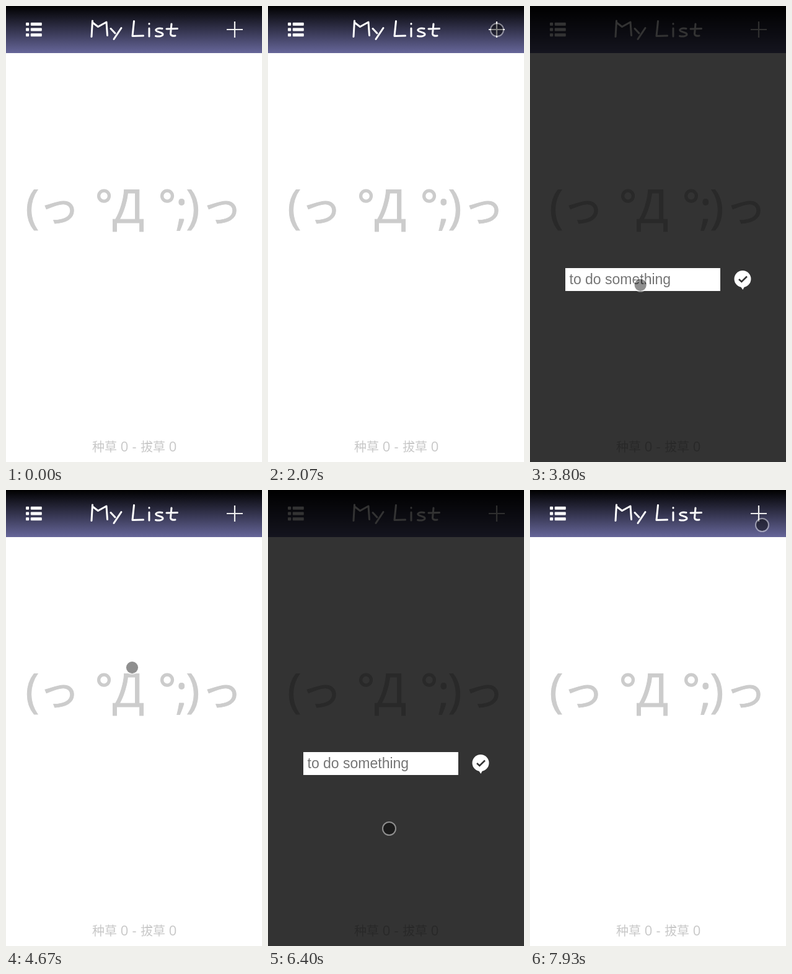
These frames come from a looping animation (413x736 px, 8 s). An HTML page:

```html
<!DOCTYPE html>
<html lang="zh">
<head>
<meta charset="utf-8">
<title>My List</title>
<style>
  html, body { margin: 0; width: 100%; height: 100%; overflow: hidden; background: #fff; }
  svg { display: block; width: 100%; height: 100%; }
  text { text-anchor: middle; }
  .face { font: 75px "Open Sans", "Noto Sans", sans-serif; fill: #ccc; stroke: #ccc; stroke-width: 1; }
  .kana { font: 67px "Noto Sans CJK JP", "Noto Sans CJK", sans-serif; }
  .degree { font-size: 68px; stroke-width: 1.5; }
  .count { font: 22px "Open Sans", "Noto Sans", sans-serif; fill: #c8c8c8; }
  .han { font: 20px "Noto Sans CJK SC", "Noto Sans CJK", sans-serif; }
  .hint { font: 23px "Liberation Sans", Arial, sans-serif; fill: #757575; text-anchor: start; }
  .stroke { fill: none; stroke: #fff; stroke-width: 3; stroke-linecap: round; stroke-linejoin: round; }
</style>
</head>
<body>
<svg viewBox="0 0 413 736">
  <defs>
    <linearGradient id="bar" x2="0" y2="1">
      <stop stop-color="#000"/>
      <stop offset="1" stop-color="#669"/>
    </linearGradient>
  </defs>

  <rect width="413" height="736" fill="#fff"/>
  <rect width="413" height="76" fill="url(#bar)"/>

  <g fill="#fff">
    <g id="row">
      <rect x="32" y="26.8" width="5.2" height="5" rx="1"/>
      <rect x="39.8" y="26.8" width="18" height="5" rx="1"/>
    </g>
    <use href="#row" y="8.7"/>
    <use href="#row" y="17.4"/>
  </g>

  <g class="stroke" role="img" aria-label="My List">
    <path d="M139.500 24L138 49.500M140 27L148.500 33.500L162 26L163.500 47.500"/>
    <path d="M169 36.500L176 44M186 35.500L174 53.500"/>
    <path d="M206.500 24.500L204 48.500L221.500 48"/>
    <path d="M231 36V49M231 28.500V29"/>
    <path d="M252 36.500C245 35 239 38 243 40.500C248 43 254 43 253 46.500C251 49.500 245 49.500 241.500 48.500"/>
    <path d="M267 29L265.500 45Q266 49 273 48M259 37L276.500 36.500"/>
  </g>
  <path d="M356 38H382M369 25V51" stroke="#eee" stroke-width="2.2"/>

  <g class="face">
    <text x="42.4" y="350">(</text>
    <text class="kana" x="85.800" y="349.300">っ</text>
    <text class="degree" x="158" y="346.400">°</text>
    <text x="197.500" y="350">Д</text>
    <text class="degree" x="260" y="346.400">°</text>
    <text x="283.500" y="352">;</text>
    <text x="301.600" y="350">)</text>
    <text class="kana" x="347.800" y="349.300">っ</text>
  </g>

  <g class="count">
    <text class="han" x="159" y="719">种草</text>
    <text x="191" y="719">0</text>
    <text x="207" y="719">-</text>
    <text class="han" x="237" y="719">拔草</text>
    <text x="269" y="719">0</text>
  </g>

  <g id="modal" visibility="hidden">
    <rect width="413" height="736" opacity=".8"/>
    <rect x="57" y="423" width="250" height="37" fill="#fff"/>
    <text class="hint" x="63.500" y="449">to do something</text>
    <circle cx="343" cy="440.500" r="13.500" fill="#fff"/>
    <path d="M340 453H346L343.300 458Z" fill="#fff"/>
    <path d="M337 441L341.300 445L350 436.500" fill="none" stroke="#333" stroke-width="2.500"/>
  </g>

  <g id="cursor" visibility="hidden">
    <circle r="9.700" opacity=".44"/>
    <circle r="10.500" fill="none" stroke="#fff" stroke-opacity=".45" stroke-width="2"/>
  </g>
</svg>
<script>
  const LOOP = 8000, FPS = 15;
  const modal = document.getElementById('modal');
  const cursor = document.getElementById('cursor');

  // Ticks at which the dialog opens and closes.
  const dialogs = [[37, 70], [84, 110]];

  // Pointer moves in ticks; "via" bends the path.
  const origin = [333.5, 334.5];
  const moves = [
    { from: 18, to: 30, end: [369.5, 39.5], via: [407, 150] },
    { from: 30, to: 31, end: [369.5, 38.5] },
    { from: 39, to: 52, end: [101.5, 436], via: [245, 250] },
    { from: 52, to: 53, end: [83.5, 442] },
    { from: 54, to: 59, end: [214.5, 453.5] },
    { from: 61, to: 66, end: [203.5, 286.5] },
    { from: 70, to: 71, end: [204.5, 285] },
    { from: 72, to: 82, end: [369.5, 47.5] },
    { from: 87, to: 96, end: [195.5, 546.5] },
    { from: 111, to: 119, end: [374.5, 56.5], via: [424, 250] }
  ];

  const easeOut = p => 1 - (1 - p) ** 1.4;

  function pointerAt(tick) {
    let pos = origin;
    for (const { from, to, end, via } of moves) {
      if (tick <= from) break;
      const p = easeOut(Math.min(1, (tick - from) / (to - from)));
      pos = pos.map((a, i) => {
        const c = via ? via[i] : (a + end[i]) / 2;
        return (1 - p) ** 2 * a + 2 * p * (1 - p) * c + p * p * end[i];
      });
    }
    return pos;
  }

  const show = (el, on) => el.setAttribute('visibility', on ? 'visible' : 'hidden');

  function draw(ms) {
    // The small lead absorbs times rounded down to 10 ms.
    const tick = Math.floor((ms % LOOP) * FPS / 1000 + 0.1);
    show(modal, dialogs.some(([open, close]) => tick >= open && tick < close));
    show(cursor, tick >= moves[0].from);
    cursor.setAttribute('transform', `translate(${pointerAt(tick)})`);
  }

  const start = performance.now();
  function loop() {
    draw(performance.now() - start);
    requestAnimationFrame(loop);
  }
  loop();
</script>
</body>
</html>
```
